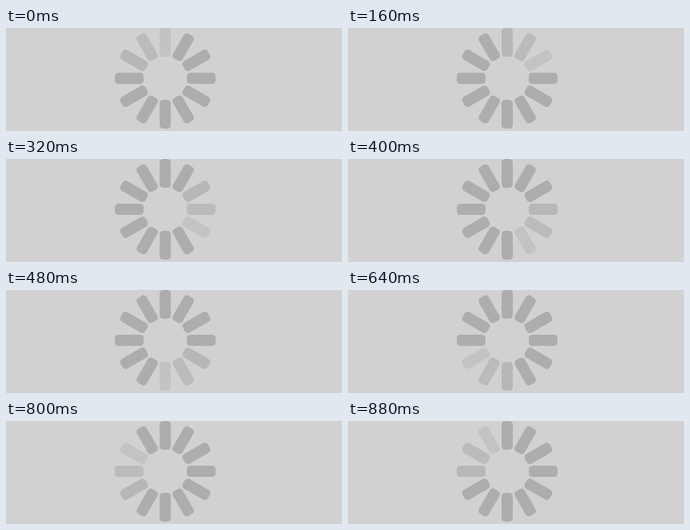
Write an HTML page with a canvas that moves like this. It is 420 by 129 pixels and loops after 960 ms.

```html
<!DOCTYPE html>
<html lang="en">
<head>
<meta charset="utf-8">
<title>Loading spinner</title>
<style>
  html, body { margin: 0; width: 100%; height: 100%; overflow: hidden; background: #d1d1d1; }
  canvas { display: block; }
</style>
</head>
<body>
<canvas id="stage" width="420" height="129"></canvas>
<script>
const ctx = document.getElementById('stage').getContext('2d');
const BARS = 12;
const STEP_MS = 80;
const BASE = '#adadad';
const TRAIL = ['#c3c3c3', '#bbbbbb', '#b7b7b7']; // head first

function drawBar(index, color) {
  ctx.save();
  ctx.translate(199, 63);
  ctx.rotate(index * 2 * Math.PI / BARS);
  ctx.fillStyle = color;
  ctx.beginPath();
  ctx.roundRect(-7, -63, 14, 36, 4.5);
  ctx.fill();
  ctx.restore();
}

function draw(time) {
  const head = Math.floor(time / STEP_MS) % BARS;
  ctx.fillStyle = '#d1d1d1';
  ctx.fillRect(0, 0, 420, 129);
  for (let i = 0; i < BARS; i++) {
    const lag = (head - i + BARS) % BARS;
    drawBar(i, TRAIL[lag] || BASE);
  }
}

let start;
function tick(now) {
  start ??= now;
  draw(now - start);
  requestAnimationFrame(tick);
}
draw(0);
requestAnimationFrame(tick);
</script>
</body>
</html>
```
